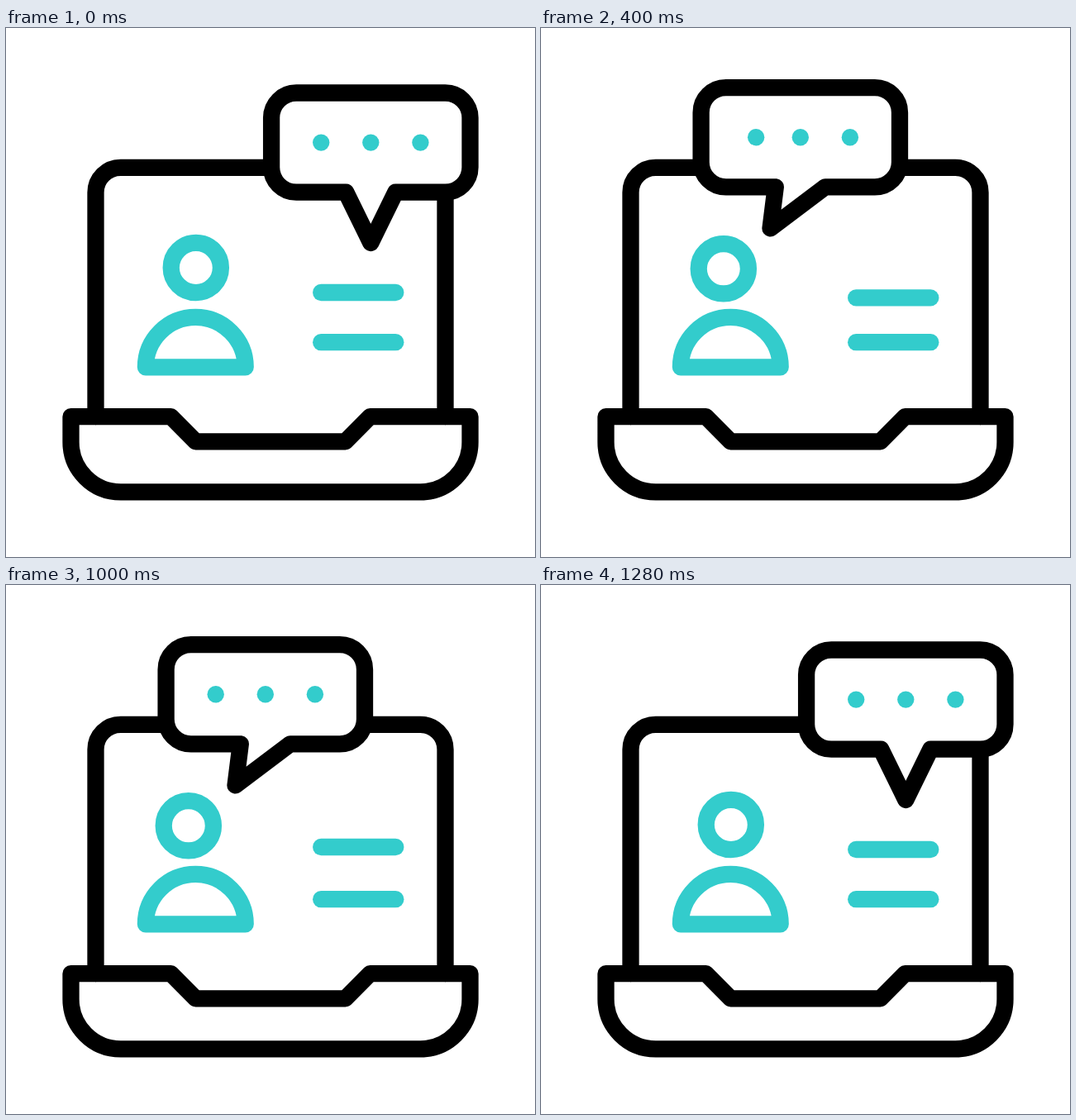
Recreate the animation shown at these times as an HTML page. Size 640 by 640 pixels, loop 1480 ms.

```html
<!DOCTYPE html>
<html lang="en">
<head>
<meta charset="utf-8">
<title>Online chat</title>
<style>
  html, body { margin: 0; width: 100%; height: 100%; overflow: hidden; background: #fff; }
  svg { display: block; width: 100vw; height: 100vh; }
  .ink, .teal { fill: none; stroke-width: 20.3; stroke-linecap: round; stroke-linejoin: round; }
  .ink { stroke: #000; }
  .teal { stroke: #3cc; }
  .dot { fill: #3cc; }
  #balloon { fill: #fff; }
</style>
</head>
<body>
<svg viewBox="0 0 640 640">
  <path class="ink" d="M108.5 470V199a30.2 30.2 0 0 1 30.2-30.2H501.3a30.2 30.2 0 0 1 30.2 30.2V470"/>
  <path class="ink" d="M78.5 470.2H199.5L229.5 500.3H410.5L440.5 470.2H561.5V501a60.4 60.4 0 0 1-60.4 60.4H138.9a60.4 60.4 0 0 1-60.4-60.4Z"/>
  <circle id="head" class="teal" cx="229.8" cy="290" r="30.1"/>
  <path class="teal" d="M168.9 410.3a60.4 60.4 0 0 1 120.8 0Z"/>
  <path id="line1" class="teal" d="M381.2 320H471.3"/>
  <path id="line2" class="teal" d="M381.2 380.2H471.3"/>
  <g id="bubble">
    <path id="balloon" class="ink"/>
    <circle id="dot1" class="dot" cx="381.2" cy="138.6" r="10.2"/>
    <circle id="dot2" class="dot" cx="441.3" cy="138.6" r="10.2"/>
    <circle class="dot" cx="501.4" cy="138.6" r="10.2"/>
  </g>
</svg>
<script>
  const LOOP = 1480, STEP = 40, BACK = 1020;
  const $ = id => document.getElementById(id);

  // 0 to 1 over a span of time
  const ramp = (t, from, span) => Math.min(1, Math.max(0, (t - from) / span));
  // 0 up to 1 and down again, peaking after half
  const hump = (t, from, half) => Math.max(0, 1 - Math.abs(t - from - half) / half);

  const move = (id, x, y) => $(id).setAttribute("transform", `translate(${x} ${y})`);

  function balloon(bend) {
    const x = 441.3 - 36.3 * bend, y = 260 - 11.2 * bend;
    return `M351.2 78.5H531.4a30.1 30.1 0 0 1 30.1 30.1V168.6a30.1 30.1 0 0 1-30.1 30.1` +
      `H471.3L${x} ${y}L411.3 198.7H351.2a30.1 30.1 0 0 1-30.1-30.1V108.6a30.1 30.1 0 0 1 30.1-30.1Z`;
  }

  function draw(t) {
    const back = ramp(t, BACK, 240);
    const slide = ramp(t, 80, 160) - back;
    const turn = ramp(t, 240, 120);
    const nod = turn - ramp(t, BACK, 170);

    move("bubble", -127.5 * slide, -6.4 * slide);
    $("balloon").setAttribute("d", balloon(turn - back));
    move("head", -9 * nod, 1.3 * nod);

    move("dot1", 44 * hump(t, 356, 300), 0);
    move("dot2", 43.4 * hump(t, 400, 300), 0);
    // the upper line rebounds slightly before it settles
    move("line1", 0, 42 * hump(t, 354, 303) - 3 * hump(t, 960, 40));
    move("line2", 0, 55.6 * hump(t, 400, 300));
  }

  const start = performance.now();
  function tick() {
    const t = (performance.now() - start) % LOOP;
    draw(Math.floor(t / STEP) * STEP);
    requestAnimationFrame(tick);
  }
  tick();
</script>
</body>
</html>
```
